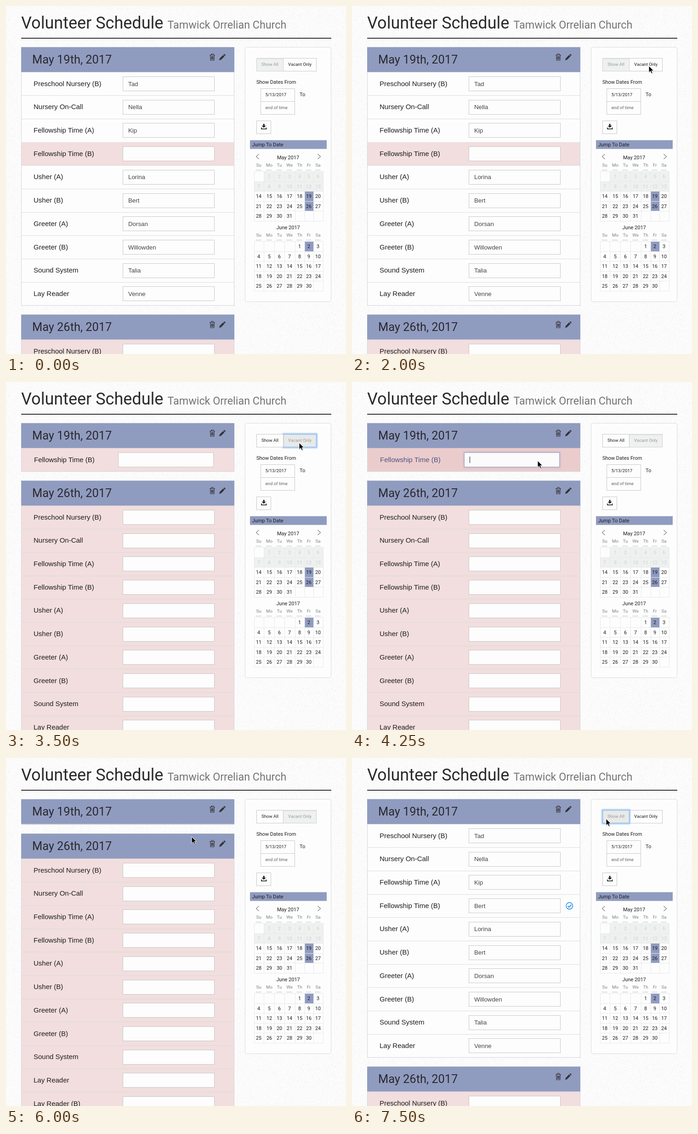
Write an HTML page with a canvas that moves like this. It is 740 px wide and 756 px high and loops after 8 s.

```html
<!DOCTYPE html>
<html lang="en">
<head>
<meta charset="utf-8">
<title>Volunteer Schedule</title>
<style>
  html, body { margin: 0; width: 100%; height: 100%; overflow: hidden; background: #fafbfa; }
  canvas, svg { position: absolute; left: 0; top: 0; }
  text { font-family: Roboto, sans-serif; fill: #1c1c1c; }
  .title { font-size: 36px; fill: #2b2b2b; }
  .sub { font-size: 23.3px; fill: #747474; }
  .date { font-size: 25.4px; fill: #2a2a2d; }
  .label { font: 15px "Liberation Sans", Arial, sans-serif; }
  .value { font: 13.3px "Liberation Sans", Arial, sans-serif; fill: #444; }
  .side { font-size: 11px; }
  .small { font-size: 9.6px; }
  .num { font-size: 10.8px; }
  .mid { text-anchor: middle; }
  .grey { fill: #999; }
  .soft { fill: #606060; }
  .week { font-size: 9.8px; fill: #7d8585; }
  .past { fill: #d3d8d8; font-weight: 500; }
  .line { fill: none; stroke: #333; }
</style>
</head>
<body>
<canvas id="paper" width="740" height="756"></canvas>
<svg id="stage" width="740" height="756" viewBox="0 0 740 756"></svg>
<script>
const LOOP = 8000;
const BLUE = '#909bc0', PINK = '#f2dede', WHITE = '#fdfdfd';
const JOBS = ['Preschool Nursery (B)', 'Nursery On-Call', 'Fellowship Time (A)', 'Fellowship Time (B)',
  'Usher (A)', 'Usher (B)', 'Greeter (A)', 'Greeter (B)', 'Sound System', 'Lay Reader', 'Lay Reader (B)'];
const PEOPLE = ['Tad', 'Nella', 'Kip', '', 'Lorina', 'Bert', 'Dorsan', 'Willowden', 'Talia', 'Venne'];
const COLS = [540, 561, 584, 606, 629, 650, 669, 690];
const CENTERS = [550, 573, 595, 617, 639, 659, 679];

// Stepped keyframes from { ms: value }, bound to a class of the same name.
let css = '';
function steps(name, prop, values) {
  const keys = Object.entries(values);
  const body = keys.map(([ms, v]) => `${ms / LOOP * 100}%{${prop}:${v}}`).join('');
  css += `@keyframes ${name}{${body}100%{${prop}:${keys[keys.length - 1][1]}}}
    .${name}{animation:${name} ${LOOP}ms step-end infinite}`;
}
const move = (x, y) => `translate(${x}px,${y}px)`;

steps('all', 'opacity', { 0: 1, 3500: 0, 7500: 1 });
steps('vacant', 'opacity', { 0: 0, 3500: 1, 7500: 0 });
steps('open', 'opacity', { 0: 0, 3500: 1, 6000: 0 });
steps('filled', 'opacity', { 0: 0, 7500: 1 });
steps('hoverVacant', 'opacity', { 0: 0, 2250: 1, 2750: 0, 3250: 1, 3500: 0 });
steps('hoverAll', 'opacity', { 0: 0, 7000: 1, 7500: 0 });
steps('ringVacant', 'opacity', { 0: 0, 3500: 1, 4250: 0 });
steps('next', 'transform', { 0: move(0, 581), 3500: move(0, 125), 6000: move(0, 75), 7500: move(0, 581) });
steps('rowFill', 'fill', { 0: PINK, 3750: '#ebcccc', 5000: '#f5f5f5' });
steps('labelFill', 'fill', { 0: '#1c1c1c', 4250: '#4b5480', 4500: '#707bbb' });
steps('focus', 'opacity', { 0: 0, 4250: .5, 4500: 1 });
steps('type1', 'opacity', { 0: 0, 5000: 1, 5500: 0 });
steps('type3', 'opacity', { 0: 0, 5500: 1, 5750: 0 });
steps('type4', 'opacity', { 0: 0, 5750: 1 });
steps('blink', 'opacity', { 0: 0, 4250: 1, 4750: 0, 5000: 1 });
steps('caret', 'transform', { 0: move(0, 0), 5000: move(9, 0), 5500: move(21, 0), 5750: move(24, 0) });
steps('mouse', 'transform', {
  0: move(760, 143), 500: move(739, 143), 750: move(657, 138), 1000: move(645, 131),
  1250: move(644, 130), 2000: move(646, 130), 2500: move(643, 130), 2750: move(639, 148),
  3000: move(639, 154), 3250: move(638, 132), 3750: move(470, 167), 4000: move(404, 171),
  6750: move(404, 157), 7000: move(552, 140), 7250: move(553, 132)
});

const text = (x, y, s, cls) => `<text x="${x}" y="${y}" class="${cls}">${s}</text>`;
const rect = (x, y, w, h, fill, extra = '') =>
  `<rect x="${x}" y="${y}" width="${w}" height="${h}" fill="${fill}" ${extra}/>`;
const box = (x, y, w, h, fill = WHITE, stroke = '#c8c8c8', extra = '') =>
  rect(x + .5, y + .5, w - 1, h - 1, fill, `stroke="${stroke}" ${extra}`);
const group = (cls, s) => `<g class="${cls}">${s}</g>`;

const rowTop = i => 143.4 + 50.7 * i;

function row(i, fill, value = '') {
  const top = rowTop(i), y = Math.round(top);
  return rect(34, y, 462, Math.round(rowTop(i + 1)) - y, fill) + rect(34, y, 462, 1, '#dcdcdc') +
    text(60, top + 30.2, JOBS[i], 'label') + box(254, Math.round(top + 9.6), 200, 32) +
    text(266, top + 30.2, value, 'value');
}

const frame = h => box(33, 89, 464, h, 'none', '#d3d5d9');

function header(date) {
  return rect(33, 89.5, 464, 54, BLUE) + text(57, 125, date, 'date') +
    `<path class="line" d="M443 106.5h12M447 106v-2h4v2M444.7 107l.6 11h7.4l.6-11M447.3 109v7M449 109v7M450.8 109v7" stroke-width="1.2"/>
    <path d="M464 118l1.2-4.2 7.2-7.2 3 3-7.2 7.2zM473.3 105.7l1.2-1.1q.7-.6 1.4 0l1.6 1.6q.6.7 0 1.4l-1.2 1.1z" fill="#333"/>`;
}

function fullCard() {
  const rows = PEOPLE.map((p, i) => row(i, p ? WHITE : PINK, p)).join('');
  const check = '<g fill="none" stroke="#1b87ee" stroke-width="1.5"><circle cx="473.3" cy="321.3" r="7.2"/>' +
    '<path d="M469.6 321.3l2.8 2.8 5-5.4" stroke-width="1.8"/></g>';
  return rows + group('filled', row(3, WHITE, 'Bert') + check) + frame(562);
}

function openRow() {
  return rect(34, 143, 462, 51, PINK, 'class="rowFill"') +
    text(61, 173.6, JOBS[3], 'label labelFill') + box(244, 153, 208, 32) +
    group('focus', box(244, 153, 208, 32, 'none', '#8d9ad8', 'stroke-width="4" filter="url(#glow)"') +
      box(244, 153, 208, 32, '#fafafa', '#7e8bc3')) +
    ['B', 'Ber', 'Bert'].map(s => text(256, 173.6, s, `value type${s.length}`)).join('') +
    group('caret', rect(256, 162, 1, 14, '#222', 'class="blink"')) + frame(106);
}

function button(x, w, label, pressed, hover, ring) {
  const name = cls => text(x + w / 2, 130.4, label, 'small mid ' + cls);
  const glow = box(x, 113, w, 29, 'none', '#8fc0ee', 'stroke-width="4" filter="url(#glow)"');
  return box(x, 113, w, 29) + name('') +
    group(hover, box(x, 113, w, 29, BLUE, '#8791b5') + name('')) +
    group(pressed, box(x, 113, w, 29, '#eff1f0', '#cfd1d0') + rect(x + 1, 114, w - 2, 2, '#e5e7e6') + name('grey')) +
    group(ring, glow + box(x, 113, w, 29, '#e9e9e9', '#9cc6ec', 'stroke-width="2"') + name('grey'));
}

function month(title, titleY, gridY, lead, days, past, marked) {
  let s = text(614, titleY, title, 'side mid');
  ['Su', 'Mo', 'Tu', 'We', 'Th', 'Fr', 'Sa'].forEach((d, c) => {
    s += text(CENTERS[c], gridY - 9.7, d, 'week mid') +
      `<path d="M${CENTERS[c] - 6} ${gridY - 2.5}h12" stroke="#888" stroke-dasharray="1 1"/>`;
  });
  const rowY = r => gridY + Math.round(21.6 * r);
  for (let i = 0; i < 35; i++) {
    const c = i % 7, r = (i - c) / 7, day = i - lead + 1;
    const real = day > 0 && day <= days, old = real && day <= past;
    const x = COLS[c], y = rowY(r), w = COLS[c + 1] - x, h = rowY(r + 1) - y;
    s += box(x, y, w + 1, h + 1, old ? '#eef1f0' : WHITE, '#e7eae9');
    if (marked.includes(day)) s += rect(x + .5, y + 1, w, h - 1, BLUE);
    if (real) s += text(CENTERS[c], y + 14.8, day, 'num mid' + (old ? ' past' : ''));
  }
  return s;
}

function sidebar() {
  return box(520, 89, 188, 554, WHITE, '#d9dbda', 'rx="4"') +
    button(603, 73, 'Vacant Only', 'vacant', 'hoverVacant', 'ringVacant') +
    button(545, 59, 'Show All', 'all', 'hoverAll', 'filled') +
    text(545, 169, 'Show Dates From', 'side') + text(639, 196, 'To', 'side') +
    box(554, 207, 75, 29) + box(554, 179, 75, 29) +
    text(564.5, 196, '5/13/2017', 'small') + text(564.5, 224, 'end of time', 'small soft') +
    box(545, 249, 32, 29) +
    '<path d="M559.7 256h3v4h3l-4.5 4.6-4.5-4.6h3z" fill="#222"/><path class="line" d="M556 264v3.2h10.5V264" stroke-width="1.8"/>' +
    rect(531, 291.5, 167, 19, BLUE) + text(535.5, 305, 'Jump To Date', 'side') +
    '<path class="line" d="M550.5 321.5l-6 5.5 6 5.5M678.5 321.5l6 5.5-6 5.5" stroke-width="1"/>' +
    month('May 2017', 332.5, 359, 1, 31, 13, [19, 26]) +
    month('June 2017', 485, 511, 4, 30, 0, [2]);
}

document.getElementById('stage').innerHTML =
  '<defs><filter id="glow" x="-20%" y="-50%" width="140%" height="200%"><feGaussianBlur stdDeviation="1.6"/></filter></defs>' +
  text(33, 48.5, 'Volunteer Schedule', 'title') + text(351.5, 48.5, 'Tamwick Orrelian Church', 'sub') +
  rect(33, 69, 675, 2, '#333') +
  rect(33, 144, 464, 1, '#d3d5d9') +
  group('all', fullCard()) + group('open', openRow()) + header('May 19th, 2017') +
  group('next', JOBS.map((_, i) => row(i, PINK)).join('') + frame(614) + header('May 26th, 2017')) +
  sidebar() +
  group('mouse', '<path d="M1 2V16l3.4-3 2.2 5 2.6-1.1L7 12h4.4z" fill="#000" opacity=".18"/>' +
    '<path d="M0 0V14.4l3.4-3 2.2 5 2.6-1.1L6 10.5h4.4z" stroke="#fff" stroke-width="1"/>');

const style = document.createElement('style');
style.textContent = css;
document.head.append(style);

// Faint paper grain.
const pen = document.getElementById('paper').getContext('2d');
let seed = 7;
const rnd = () => (seed = (seed * 16807) % 2147483647) / 2147483647;
pen.fillStyle = '#fbfcfb';
pen.fillRect(0, 0, 740, 756);
pen.fillStyle = 'rgba(60,80,70,.03)';
for (let i = 0; i < 70000; i++) pen.fillRect(rnd() * 740 | 0, rnd() * 756 | 0, 1 + rnd() * 2 | 0, 1);
</script>
</body>
</html>
```
